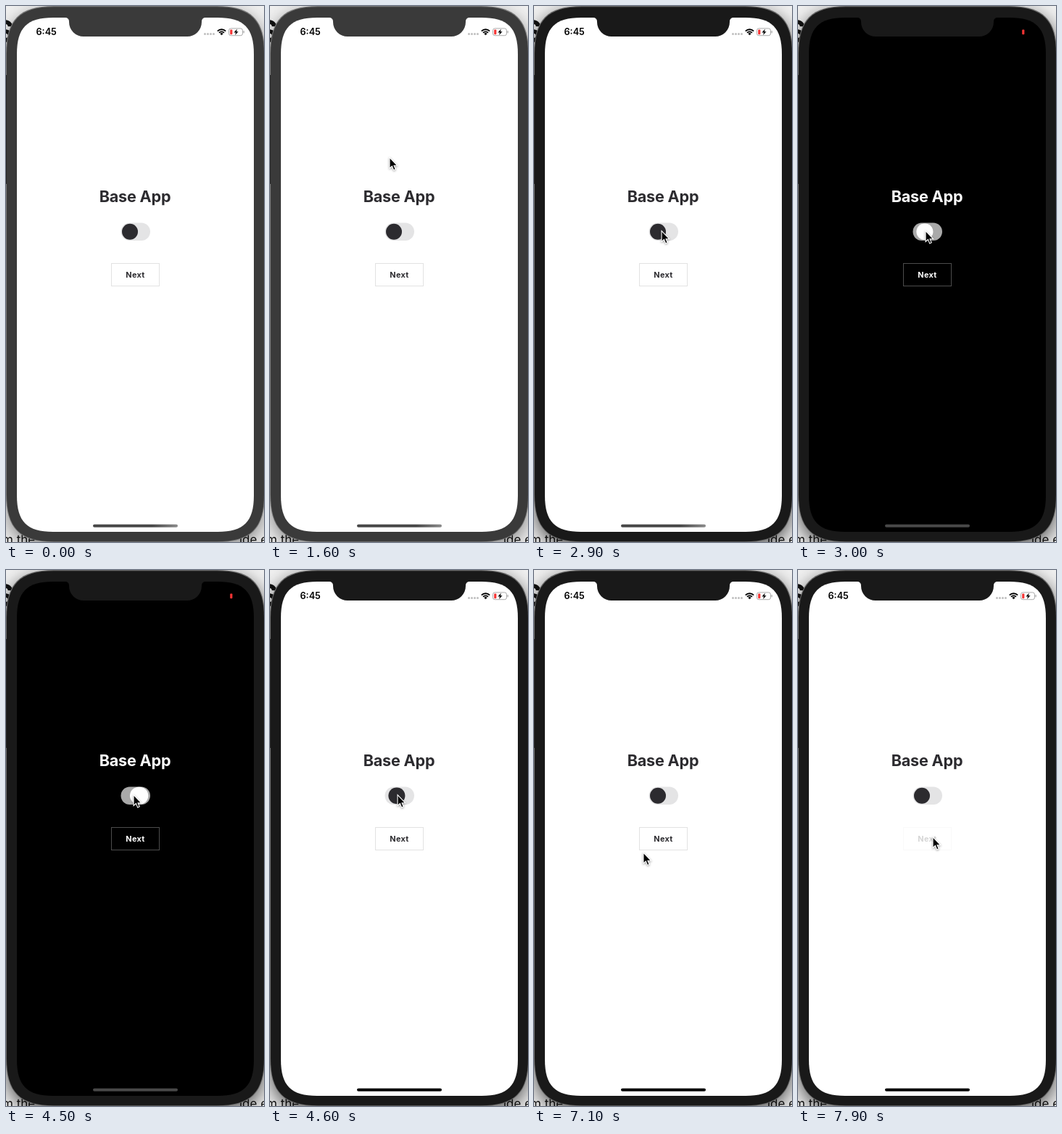
Write an HTML page with a canvas that moves like this. It is 356 px wide and 738 px high and loops after 8000 ms.

```html
<!DOCTYPE html>
<html lang="en">
<head>
<meta charset="utf-8">
<title>Base App</title>
<style>
  html, body { margin: 0; width: 100%; height: 100%; overflow: hidden; background: #eee; }
  canvas { display: block; width: 356px; height: 738px; }
</style>
</head>
<body>
<canvas id="stage"></canvas>
<script>
const W = 356, H = 738, LOOP = 8000, STEP = 100;
const INK = '#2c2b2f';
const FOCUS = 2900, DARK = 3000, LIGHT = 4600, PRESS = 7900;
const canvas = document.getElementById('stage');
const ctx = canvas.getContext('2d');
const ratio = window.devicePixelRatio || 1;
canvas.width = W * ratio;
canvas.height = H * ratio;

// Pointer strokes: start, end, and where each one lands
const ENTRY = { x: 228, y: 700 };
const MOVES = [
  { from: 700, to: 800, x: 182, y: 499 },
  { from: 900, to: 1600, x: 165, y: 209 },
  { from: 1600, to: 2500, x: 176, y: 310 },
  { from: 5900, to: 6100, x: 176, y: 317 },
  { from: 6300, to: 7200, x: 150, y: 392 },
  { from: 7200, to: 7700, x: 186, y: 368 }
];

function ease(t, from, to) {
  const u = Math.min(1, Math.max(0, (t - from) / (to - from)));
  return u * u * (3 - 2 * u);
}

function pointerAt(t) {
  let { x, y } = ENTRY;
  for (const move of MOVES) {
    const k = ease(t, move.from, move.to);
    x += (move.x - x) * k;
    y += (move.y - y) * k;
  }
  return [x, y];
}

function box(x, y, w, h, r, fill) {
  ctx.beginPath();
  ctx.roundRect(x, y, w, h, r);
  ctx.fillStyle = fill;
  ctx.fill();
}

// Rectangle whose corners bend gradually over the length e
function smoothBox(x, y, w, h, e, fill) {
  const c = e * 0.28, r = x + w, b = y + h;
  ctx.beginPath();
  ctx.moveTo(x, y + e);
  ctx.bezierCurveTo(x, y + c, x + c, y, x + e, y);
  ctx.lineTo(r - e, y);
  ctx.bezierCurveTo(r - c, y, r, y + c, r, y + e);
  ctx.lineTo(r, b - e);
  ctx.bezierCurveTo(r, b - c, r - c, b, r - e, b);
  ctx.lineTo(x + e, b);
  ctx.bezierCurveTo(x + c, b, x, b - c, x, b - e);
  ctx.closePath();
  ctx.fillStyle = fill;
  ctx.fill();
}

function text(str, x, y, size, weight, fill, align = 'left', spacing = 0) {
  ctx.font = `${weight} ${size}px Inter, "Liberation Sans", sans-serif`;
  ctx.letterSpacing = spacing + 'px';
  ctx.textAlign = align;
  ctx.fillStyle = fill;
  ctx.fillText(str, x, y);
}

function drawDesktop() {
  ctx.fillStyle = '#f2f2f2';
  ctx.fillRect(0, 0, W, H);
  text('S', -17, 50, 43, 700, '#111');
  text('m the', -5, 741, 17, 400, '#111');
  text('ide e', 322, 741, 17, 400, '#111');
}

function drawBody(active, shell) {
  ctx.save();
  ctx.shadowColor = active ? 'rgba(0,0,0,.65)' : 'rgba(0,0,0,.45)';
  ctx.shadowBlur = 26 * ratio;
  ctx.shadowOffsetY = 8 * ratio;
  smoothBox(0, 0, W + 1, H, 66, active ? '#686868' : '#777');
  ctx.restore();
  smoothBox(1, 1.3, W - 1, H - 2, 65, shell);
  box(0, 95, 1, 150, 0, '#222');
}

function drawNotch(shell) {
  const left = 87, right = 270, top = 16, bottom = 42, flare = 5, r = 20;
  ctx.beginPath();
  ctx.moveTo(left - flare, top - 1);
  ctx.lineTo(left - flare, top);
  ctx.arcTo(left, top, left, top + flare, flare);
  ctx.arcTo(left, bottom, left + r, bottom, r);
  ctx.arcTo(right, bottom, right, bottom - r, r);
  ctx.arcTo(right, top, right + flare, top, flare);
  ctx.lineTo(right + flare, top - 1);
  ctx.closePath();
  ctx.fillStyle = shell;
  ctx.fill();
}

function drawWifi() {
  const x = 297.5, y = 40.3, spread = Math.PI / 4;
  ctx.strokeStyle = ctx.fillStyle = '#000';
  ctx.lineWidth = 1.9;
  for (const r of [8, 4.9]) {
    ctx.beginPath();
    ctx.arc(x, y, r, -spread * 3, -spread);
    ctx.stroke();
  }
  ctx.beginPath();
  ctx.moveTo(x, y);
  ctx.arc(x, y, 3, -spread * 3, -spread);
  ctx.fill();
}

function drawStatus(dark) {
  if (!dark) {
    text('6:45', 41.5, 40, 12.7, 600, '#000');
    for (let i = 0; i < 4; i++) box(273 + i * 4, 37, 3, 3, 1.5, '#bfbfbf');
    drawWifi();
    ctx.beginPath();
    ctx.roundRect(307.5, 30.9, 19, 9.8, 2.8);
    ctx.lineWidth = 1;
    ctx.strokeStyle = '#aaa';
    ctx.stroke();
    box(327.5, 34, 1.3, 3.5, 1, '#aaa');
    ctx.fillStyle = '#000';
    ctx.fill(new Path2D('M318.8 31.8l-4.4 4.7h2.6l-.8 3.5 4.4-4.8h-2.6z'));
  }
  box(309.2, 32.4, 3.2, 6.8, 1, '#f53434');
}

function drawSwitch(t, dark) {
  const on = ease(t, FOCUS, FOCUS + 300) - ease(t, LIGHT - 160, LIGHT + 80);
  const w = 22 + 4 * on, r = 11 + 1.2 * on, x = 171 + 15 * on;
  box(158.5, 298.5, 40.5, 24.5, 12.25, dark ? '#a9a9a9' : '#e4e4e5');
  box(x - w / 2, 310.8 - r, w, r * 2, r, dark ? '#fff' : INK);
}

function drawButton(dark, pressed) {
  ctx.save();
  if (pressed) ctx.globalAlpha = 0.2;
  ctx.strokeStyle = dark ? '#4c4c4c' : '#e2e2e2';
  ctx.lineWidth = 1;
  ctx.strokeRect(145.5, 354.5, 66, 31);
  text('Next', 178.4, 374, 10.9, 700, dark ? '#fff' : INK, 'center', 0.3);
  ctx.restore();
}

function drawHome(t, dark) {
  let fill = dark ? '#484848' : '#000';
  if (t < DARK) {
    fill = ctx.createLinearGradient(120, 0, 237, 0);
    fill.addColorStop(0.7, '#484848');
    fill.addColorStop(1, '#8c8c8c');
  }
  box(120, 713.8, 117, 4, 2, fill);
}

function drawPointer(t) {
  if (t < MOVES[0].from) return;
  const arrow = new Path2D('M.6 1v12.3l3-2.7 2.4 5.6 1.5-.7-2.3-5.3h4.2z');
  ctx.save();
  ctx.translate(...pointerAt(t));
  ctx.shadowColor = 'rgba(0,0,0,.4)';
  ctx.shadowBlur = 3 * ratio;
  ctx.shadowOffsetY = ratio;
  ctx.lineWidth = 2.2;
  ctx.strokeStyle = '#fff';
  ctx.stroke(arrow);
  ctx.shadowColor = 'transparent';
  ctx.fillStyle = '#000';
  ctx.fill(arrow);
  ctx.restore();
}

function render(t) {
  const active = t >= FOCUS;
  const dark = t >= DARK && t < LIGHT;
  const shell = active ? '#191919' : '#3a3a3a';
  ctx.setTransform(ratio, 0, 0, ratio, 0, 0);
  drawDesktop();
  drawBody(active, shell);
  smoothBox(15, 16, 327, 708, 50, dark ? '#000' : '#fff');
  drawNotch(shell);
  drawStatus(dark);
  text('Base App', 178, 270, 21.6, 700, dark ? '#fff' : INK, 'center', -0.2);
  drawSwitch(t, dark);
  drawButton(dark, t >= PRESS);
  drawHome(t, dark);
  drawPointer(t);
}

const start = performance.now();
function tick() {
  const t = (performance.now() - start) % LOOP;
  render(Math.floor(t / STEP) * STEP);
  requestAnimationFrame(tick);
}
tick();
</script>
</body>
</html>
```
